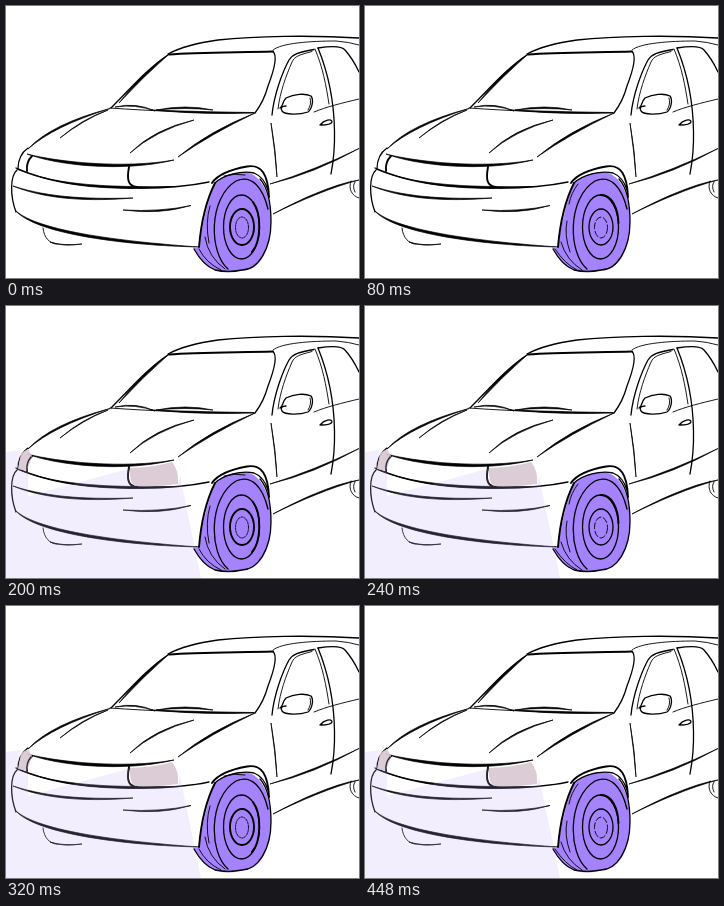
Animation, 353 px wide and 272 px high, one loop 480 ms. Source, as an HTML page without scripts:

```html
<!DOCTYPE html>
<html lang="en">
<head>
<meta charset="utf-8">
<title>Car with rolling wheel and headlights</title>
<style>
  html, body { margin: 0; width: 100%; height: 100%; overflow: hidden; background: #fff; }
  svg { display: block; width: 100vw; height: 100vh; }
  .ink { fill: none; stroke: #000; stroke-width: 1.3; stroke-linecap: round; stroke-linejoin: round; }
  .thin { stroke-width: .9; }
  .bold { stroke-width: 1.9; }
  .taper { fill: #000; stroke: #000; stroke-width: .7; stroke-linejoin: round; }
  .roll-a, .roll-b { animation: roll 160ms step-end infinite; }
  .roll-b { animation-delay: -80ms; }
  .lights { animation: lights 480ms step-end infinite; }
  @keyframes roll { 0% { visibility: visible; } 50%, 100% { visibility: hidden; } }
  @keyframes lights { 0% { visibility: hidden; } 41.667%, 100% { visibility: visible; } }
</style>
</head>
<body>
<svg viewBox="0 0 353 272" preserveAspectRatio="none">
  <!-- roof and windscreen -->
  <g class="ink">
    <path d="M162 48C175 41 190 37 212 34C250 30 305 29 353 32"/>
    <path class="thin" d="M267 44C275 37 305 35 330 35Q343 36 353 39"/>
    <path class="bold" d="M163 48.500C190 46.500 232 46.500 267 45.500"/>
    <path d="M162 49C143 61 124 83 105 102"/>
    <path d="M267 45.500C272 50 267 67 262 80Q258 95 249 107"/>
    <path class="thin" d="M104 102C145 105 200 107 248 107"/>
  </g>
  <g class="taper">
    <path d="M162 49Q135 68 113 97Q137 71 162 49Z"/>
    <path d="M109 101Q130 96 149 105Q130 98 109 101Z"/>
    <path d="M150 104Q180 98 207 104Q180 101 150 104Z"/>
    <path d="M145 104Q205 106 248 106.500Q205 109.500 145 104Z"/>
  </g>

  <!-- bonnet -->
  <g class="taper">
    <path d="M104 102.500Q45 118 22 143Q47 120.500 104 102.500Z"/>
    <path d="M102 104Q76 113 54 132Q77 114 102 104Z"/>
    <path d="M124 147Q148 123 188 114Q149 125 124 147Z"/>
    <path d="M249 107Q203 125 172 151Q205 128 249 107Z"/>
    <path d="M21 148C52 156 118 163 168 154C117 166.500 52 159.500 21 148Z"/>
  </g>

  <!-- lamps and bumper -->
  <g class="ink">
    <path d="M22 142Q12 149 12 163"/>
    <path d="M10 162C40 175 78 181 112 181.500C146 183 179 181 203 176"/>
    <path class="bold" d="M26 150Q20 156 21 165"/>
    <path class="bold" d="M123 161C121 172 121 180 131 181"/>
    <path d="M11 164C4 170 4 190 10 206"/>
    <path class="thin" d="M37 222C38 232 44 238 51 238"/>
  </g>
  <g class="taper">
    <path d="M11 163C53 181 112 181 170 180.500C111 185 55 182 11 163Z"/>
    <path d="M7 180C45 192.500 87 193 127 192C85 195.500 41 194 7 180Z"/>
    <path d="M117 204Q155 206 185 199.500Q154 209 117 204Z"/>
    <path d="M9 204C31 226 123 236 193 241C122 239.500 29 228.500 9 204Z"/>
    <path d="M44 236Q56 240 76 238Q57 241 44 236Z"/>
  </g>

  <!-- doors and side -->
  <g class="ink">
    <path d="M308 43.500C293 46 287 48 283 54C277 65 268 88 266 109"/>
    <path class="thin" d="M306 45.500C293 49 289 50 286 56C280 70 274 86 272 103"/>
    <path class="thin" d="M309 43C317 62 320 79 323 98"/>
    <path d="M312 42C321 64 328 94 328.500 125Q329 147 325 168"/>
    <path d="M312 42C324 40 335 39 339 44Q347 53 353 66"/>
    <path class="thin" d="M308 106C320 101 336 97 353 93"/>
    <path d="M274 102C278 99 276 96 280 92C288 88 299 87 305 90C308 94 306 103 302 106C293 109 279 109 276 105C274 102 276 100 280 100"/>
    <path class="thin" d="M304 92Q306 98 302 104"/>
    <path d="M314 119C318 114 326 112 326 116C325 119 319 119 315 119"/>
    <path class="thin" d="M345 175C342 183 346 190 353 192M349 176Q346 180 349 186"/>
  </g>
  <g class="taper">
    <path d="M264 178Q308 164.500 353 142.500Q308 167.500 264 178Z"/>
    <path d="M267 208C292 194.500 327 178 353 174C326 181 292 195.500 267 208Z"/>
    <path d="M265 117Q269 145 271 171Q270 145 265 117Z"/>
  </g>

  <!-- headlight beams -->
  <g class="lights">
    <path fill="#beaafa" fill-opacity=".2" d="M0 146L14 144L12 163L22 166V190L122 163L124 179L150 181L172 179L174 170L195 272H0Z"/>
    <path fill="#d8c8d2" fill-opacity=".92" d="M22 143L15 147L12 163L21 165L26 150Z"/>
    <path fill="#d8c8d2" fill-opacity=".92" d="M124 162Q150 161 166 156Q173 164 172 178Q151 181 130 180Q123 178 124 162Z"/>
    <path class="ink" style="stroke:#2c2832" d="M25 151Q20 157 21 165M123 162C121 171 122 179 129 181"/>
  </g>

  <!-- front wheel -->
  <path fill="#a583fc" d="M187 241L193 241C196 219 202 193 210 176Q222 166 237 166C254 166 265 187 265 215C265 242 255 264 237 264Q226 267 212 265C199 262 193 252 187 241Z"/>
  <g class="ink">
    <path class="bold" d="M193 241C195 217 201 193 209 177"/>
    <path d="M209 177C217 169 236 164 248 167Q258 171 262 184"/>
    <path d="M254 173C262 182 265 198 265 216C265 243 252 264 236 264Q222 267 209 264C199 260 193 252 188 243"/>
    <path class="bold" d="M206 177C212 168 227 163 241 160.500C256 158 262 169 263 191"/>
    <path d="M222 263C203 247 202 192 230 175C246 168 257 182 262 203"/>
  </g>
  <g class="roll-a">
    <g class="ink">
      <path class="thin" d="M193 243Q200 257 215 264M199 231Q202 251 219 263M204 200Q199 217 203 237M218 170Q229 167 239 169"/>
      <ellipse cx="235.500" cy="221" rx="18" ry="32"/>
      <path class="bold" d="M247 196C256 208 255 236 246 246"/>
      <ellipse class="bold" cx="236" cy="221" rx="12" ry="18"/>
      <ellipse class="thin" cx="236" cy="221.500" rx="6.500" ry="10.500" stroke-dasharray="1.800 1.200"/>
    </g>
  </g>
  <g class="roll-b">
    <g class="ink">
      <path class="thin" d="M190 243Q200 258 212 264M196 236Q201 254 217 264M202 215Q199 229 205 246M213 178Q206 187 204 198"/>
      <ellipse cx="235.500" cy="221" rx="18" ry="32"/>
      <path class="bold" d="M236 189C247 189 253 202 253.500 217"/>
      <ellipse cx="236" cy="221" rx="12" ry="18"/>
      <ellipse class="thin" cx="236" cy="221.500" rx="6.500" ry="10.500" stroke-dasharray="6 2.500"/>
    </g>
  </g>
</svg>
</body>
</html>
```
